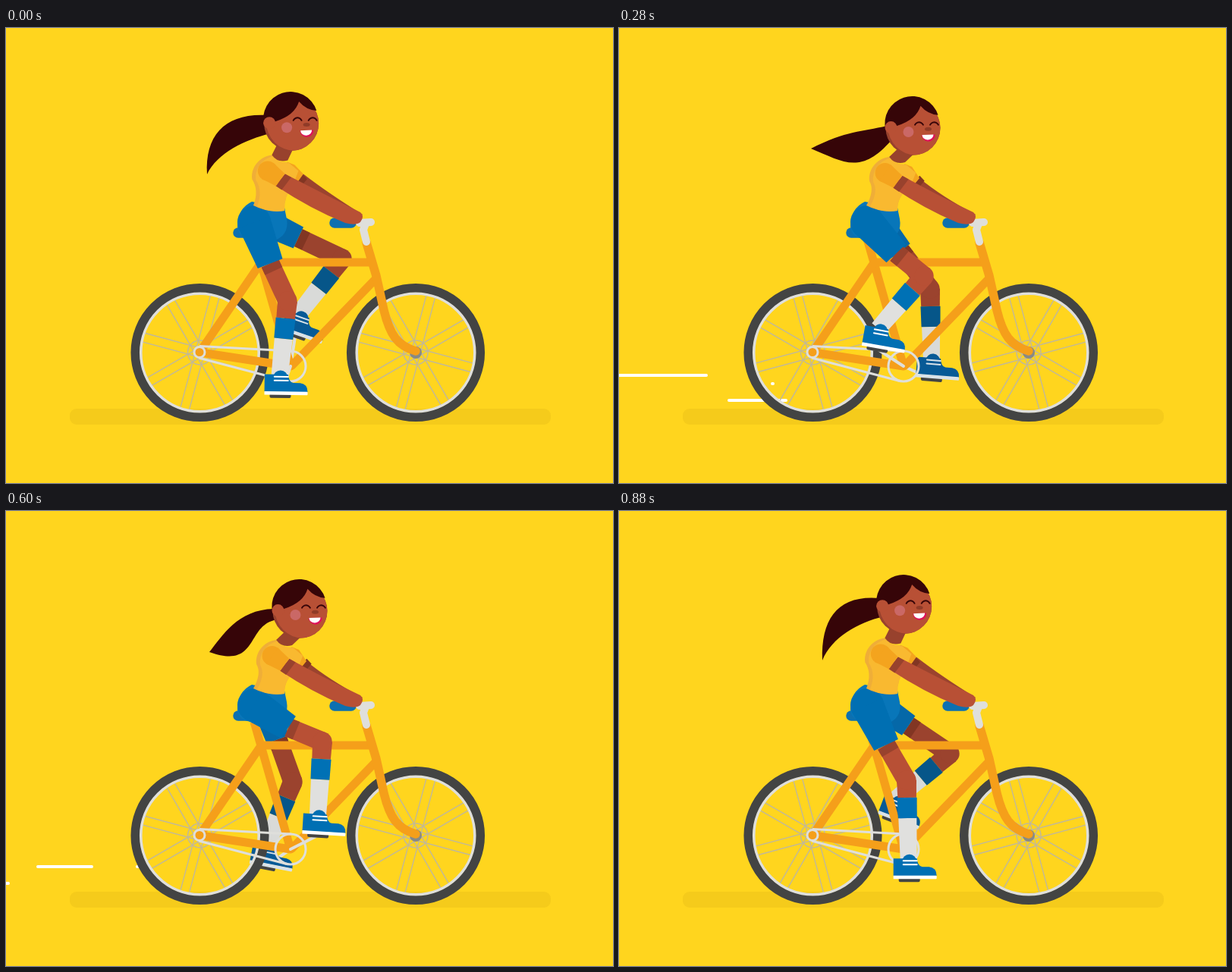
Write an HTML page with a canvas that moves like this. It is 800 by 600 pixels and loops after 0.96 s.

```html
<!DOCTYPE html>
<html lang="en">
<head>
<meta charset="utf-8">
<title>Cyclist</title>
<style>
  html, body { margin: 0; width: 100%; height: 100%; overflow: hidden; background: #ffd51e; }
  canvas { display: block; }
</style>
</head>
<body>
<canvas id="stage" width="800" height="600"></canvas>
<script>
const ctx = document.getElementById('stage').getContext('2d');
const LOOP = 960, STEP = 40, LAST_STEP = 22;
const TAU = Math.PI * 2, DEG = Math.PI / 180;
const CRANK = [375, 446], CRANK_R = 41;

const C = {
  bg: '#ffd51e', ground: '#f5cb1b', tyre: '#434443', rim: '#dfdfdb', spoke: '#c1b899',
  frame: '#f59f1a', metal: '#dfdfdb', grip: '#0d70b0',
  skin: '#b85035', skinDark: '#98422d', hair: '#360508',
  shirt: '#f9b930', shirtEdge: '#efae38', sleeve: '#f4a41e',
  hip: '#0876b9', white: '#ffffff'
};
const NEAR = { skin: C.skin, band: C.skinDark, shorts: '#006fb2', sock: '#0071b5', shin: '#e0e0de', shoe: '#006fb3', sole: '#ffffff' };
const FAR = { skin: '#9b432e', band: '#823623', shorts: '#0568a8', sock: '#065689', shin: '#d9dad8', shoe: '#075a96', sole: '#d9e2e8' };

// Poses are given at these times and joined by smooth periodic curves.
const KEY_TIMES = [0, 160, 280, 440, 600, 720, 880];
const NEAR_KNEE = [[371, 360], [380, 349], [402, 327], [425, 294], [417, 304], [404, 333], [379, 355]];
const FAR_KNEE = [[443, 304], [429, 316], [410, 344], [373, 358], [378, 357], [394, 345], [436, 320]];
// Root, two handles, tip, two handles, root.
const PONYTAIL = [
  [344, 115, 290, 112, 262, 140, 265, 193, 278, 165, 315, 147, 349, 139],
  [355, 132, 330, 140, 262, 122, 260, 168, 280, 156, 310, 190, 362, 150],
  [353, 129, 320, 137, 300, 135, 253, 159, 295, 176, 318, 195, 359, 148],
  [341, 120, 305, 135, 308, 170, 247, 157, 268, 200, 322, 208, 348, 142],
  [353, 129, 305, 130, 285, 165, 268, 186, 335, 210, 315, 148, 359, 143],
  [356, 129, 305, 122, 285, 153, 278, 202, 310, 190, 315, 155, 362, 146],
  [344, 115, 290, 110, 266, 140, 268, 197, 280, 167, 315, 147, 349, 139]
];
// Each streak: height, then time, left end, right end.
const STREAKS = [
  [458, [[100, 148, 152], [160, 107, 140], [280, -10, 117], [360, -90, 60], [430, -160, -10]]],
  [491, [[140, 240, 244], [160, 231, 239], [280, 143, 222], [440, 16, 140], [600, -70, 5], [640, -90, -40]]],
  [469, [[260, 207, 211], [280, 200, 205], [440, 105, 181], [600, 40, 115], [720, 20, 29], [740, 17, 21]]],
  [469, [[410, 222, 227], [440, 214, 219], [600, 171, 176], [720, 148, 153], [780, 139, 143]]]
];

function track(keys, t) {
  const n = keys.length;
  const time = i => KEY_TIMES[(i + n) % n] + LOOP * Math.floor(i / n);
  const value = i => keys[(i + n) % n];
  let i = n - 1;
  while (time(i) > t) i--;
  const span = time(i + 1) - time(i), u = (t - time(i)) / span;
  return value(i).map((a, k) => {
    const b = value(i + 1)[k];
    const m0 = (b - value(i - 1)[k]) / (time(i + 1) - time(i - 1)) * span;
    const m1 = (value(i + 2)[k] - a) / (time(i + 2) - time(i)) * span;
    const d = b - a;
    return a + u * (m0 + u * (3 * d - 2 * m0 - m1 + u * (m0 + m1 - 2 * d)));
  });
}

const add = (p, x, y) => [p[0] + x, p[1] + y];
const toward = (a, b, dist) => {
  const len = Math.hypot(b[0] - a[0], b[1] - a[1]);
  return [a[0] + (b[0] - a[0]) * dist / len, a[1] + (b[1] - a[1]) * dist / len];
};
const mix = (a, b, u) => a + (b - a) * u;

function fill(color) { ctx.fillStyle = color; ctx.fill(); }
function disc(x, y, r, color) { ctx.beginPath(); ctx.arc(x, y, r, 0, TAU); fill(color); }
function ring(x, y, r, w, color) {
  ctx.beginPath(); ctx.arc(x, y, r, 0, TAU);
  ctx.lineWidth = w; ctx.strokeStyle = color; ctx.stroke();
}
function line(points, w, color, cap = 'butt') {
  ctx.beginPath();
  points.forEach(p => ctx.lineTo(...p));
  ctx.lineWidth = w; ctx.strokeStyle = color; ctx.lineCap = cap; ctx.lineJoin = 'round';
  ctx.stroke();
}
function poly(points, color) {
  ctx.beginPath();
  points.forEach(p => ctx.lineTo(...p));
  ctx.closePath(); fill(color);
}
function pill(x, y, w, h, r, color) { ctx.beginPath(); ctx.roundRect(x, y, w, h, r); fill(color); }
// Tapered bar between two points with given half widths.
function limb(a, b, ra, rb, color) {
  const len = Math.hypot(b[0] - a[0], b[1] - a[1]);
  const nx = -(b[1] - a[1]) / len, ny = (b[0] - a[0]) / len;
  poly([add(a, nx * ra, ny * ra), add(b, nx * rb, ny * rb), add(b, -nx * rb, -ny * rb), add(a, -nx * ra, -ny * ra)], color);
}

function drawStreaks(t) {
  for (const [y, keys] of STREAKS) {
    const i = keys.findIndex((k, j) => j + 1 < keys.length && t >= k[0] && t < keys[j + 1][0]);
    if (i < 0) continue;
    const [a, b] = [keys[i], keys[i + 1]], u = (t - a[0]) / (b[0] - a[0]);
    line([[mix(a[1], b[1], u) + 2, y], [mix(a[2], b[2], u) - 2, y]], 4, C.white, 'round');
  }
}

function drawWheel(x, y, angle) {
  ctx.save();
  ctx.translate(x, y);
  ctx.rotate(angle);
  for (let i = 0; i < 4; i++) {
    for (const off of [-6, 6]) line([[-77, off], [77, off]], 1.4, C.spoke);
    ctx.rotate(Math.PI / 4);
  }
  ctx.restore();
  ring(x, y, 16, 1.5, C.spoke);
  ring(x, y, 78, 4, C.rim);
  ring(x, y, 85.3, 11.5, C.tyre);
}

function pedalAt(phase) {
  return [CRANK[0] - 0.5 - CRANK_R * Math.sin(phase), CRANK[1] + CRANK_R * Math.cos(phase)];
}

function drawShoe(pedal, tilt, k) {
  ctx.save();
  ctx.translate(...pedal);
  ctx.rotate(tilt);
  pill(-14, -3, 28, 6, 2, C.tyre);
  disc(0, -24, 9.5, k.shoe);
  ctx.beginPath();
  ctx.moveTo(-21, -28);
  ctx.lineTo(10, -28);
  ctx.quadraticCurveTo(11, -18, 17, -17);
  ctx.lineTo(26, -17);
  ctx.quadraticCurveTo(36, -16, 36, -5);
  ctx.lineTo(-21, -5);
  ctx.closePath();
  fill(k.shoe);
  pill(-21, -5.5, 57, 4.5, [0, 1, 1, 0], k.sole);
  for (const y of [-25, -20]) line([[-8, y], [10, y]], 2, k.sole, 'round');
  ctx.restore();
}

function drawLeg(hip, knee, pedal, tilt, k) {
  const ankle = add(pedal, 27 * Math.sin(tilt) * 0.5 - 1, -27);
  const hem = toward(hip, knee, 48);
  const sockTop = toward(knee, ankle, 23), sockEnd = toward(knee, ankle, 50);
  limb(knee, sockTop, 13, 12.3, k.skin);
  limb(hem, knee, 12.5, 12.7, k.skin);
  disc(...knee, 12.7, k.skin);
  limb(hem, toward(hem, knee, 11), 12.5, 12.5, k.band);
  limb(sockEnd, ankle, 12, 11, k.shin);
  limb(sockTop, sockEnd, 13, 12.5, k.sock);
  drawShoe(pedal, tilt, k);
  return hem;
}

function drawFrame() {
  line([[327, 278], [375, 446]], 11, C.frame);
  line([[335, 311], [257, 425]], 11, C.frame, 'round');
  line([[257, 428], [375, 446]], 11, C.frame, 'round');
  line([[334, 309], [483, 309]], 11, C.frame);
  line([[488, 330], [377, 445]], 11, C.frame, 'round');
  disc(540, 428, 8, '#888a85');
  ctx.beginPath();
  ctx.moveTo(475, 283);
  ctx.lineTo(488, 327);
  ctx.lineTo(498, 372);
  ctx.bezierCurveTo(506, 405, 516, 419, 540, 426);
  ctx.lineWidth = 11.5; ctx.strokeStyle = C.frame; ctx.lineCap = 'round'; ctx.stroke();
  line([[306, 270], [332, 270]], 13.5, C.grip, 'round');
}

function drawDrive(nearPedal) {
  line([[255, 419.5], [376, 426]], 3, C.metal);
  line([[254, 435], [370, 465.5]], 3, C.metal);
  disc(255, 427.5, 6, C.frame);
  ring(255, 427.5, 7, 3, C.metal);
  ring(...CRANK, 20, 3, C.metal);
  line([CRANK, nearPedal], 4, C.metal, 'round');
}

function drawHandlebar() {
  line([[433, 257], [455, 257]], 13.5, C.grip, 'round');
  line([[466, 257], [481, 256]], 10, C.metal, 'round');
  line([[474, 258], [471, 266], [475, 282]], 10, C.metal, 'round');
}

function drawShorts(hip, hem) {
  ctx.beginPath();
  ctx.moveTo(324, 229);
  ctx.quadraticCurveTo(305, 238, 305, 262);
  ctx.quadraticCurveTo(306, 277, 325, 278);
  ctx.lineTo(350, 282);
  ctx.quadraticCurveTo(374, 274, 370, 252);
  ctx.lineTo(367, 237);
  ctx.closePath();
  fill(C.hip);
  disc(327, 256, 22, NEAR.shorts);
  limb([327, 256], hem, 22, 17.5, NEAR.shorts);
}

function torsoPath(sx, sy) {
  ctx.beginPath();
  ctx.moveTo(354 + sx, 169 + sy);
  ctx.bezierCurveTo(338 + sx, 171 + sy, 326 + sx, 185 + sy, 328 + sx, 201 + sy);
  ctx.quadraticCurveTo(336 + sx * 0.6, 214, 326, 234);
  ctx.quadraticCurveTo(345, 244, 367, 241);
  ctx.quadraticCurveTo(366, 222, 382 + sx, 208 + sy);
  ctx.lineTo(389 + sx, 190 + sy);
  ctx.lineTo(376 + sx, 179 + sy);
  ctx.quadraticCurveTo(362 + sx, 180 + sy, 354 + sx, 169 + sy);
  ctx.closePath();
}

function drawTorso(lean, head) {
  const sx = 4.2 * lean, sy = 1.8 * lean;
  const cuffTop = [394.5 + 3 * lean, 196 + 4 * lean], cuffLow = [386 + 3 * lean, 207 + 3 * lean];
  ctx.beginPath();
  ctx.moveTo(...cuffTop);
  ctx.quadraticCurveTo(424, 220 + 3 * lean, 470, 246);
  ctx.lineTo(455, 252);
  ctx.lineTo(...cuffLow);
  fill(FAR.skin);
  limb([389 + sx, 200 + sy], [396 + sx, 206 + sy], 8, 7, FAR.band);
  poly([[374 + sx, 178 + sy], [384 + sx, 182 + sy], cuffTop, cuffLow], C.sleeve);

  torsoPath(sx, sy);
  fill(C.shirtEdge);
  ctx.save();
  ctx.clip();
  ctx.translate(5, 1);
  torsoPath(sx, sy);
  fill(C.shirt);
  ctx.restore();

  ctx.beginPath();
  ctx.moveTo(head[0] - 17, head[1] + 28);
  ctx.lineTo(354 + sx, 169 + sy);
  ctx.quadraticCurveTo(362 + sx, 180 + sy, 375 + sx, 176 + sy);
  ctx.lineTo(head[0] + 3, head[1] + 36);
  ctx.closePath();
  fill(C.skinDark);
}

function drawNearArm(lean) {
  const s = [348.5 + 4.2 * lean, 190 + 1.8 * lean];
  const top = add(s, 23, 4), low = add(s, 10.5, 19.5);
  ctx.beginPath();
  ctx.moveTo(...top);
  ctx.quadraticCurveTo((top[0] + 468) / 2, 220 + 2 * lean, 467, 243);
  ctx.quadraticCurveTo(473, 248, 467, 256);
  ctx.quadraticCurveTo(461, 261, 447, 257);
  ctx.quadraticCurveTo(403 + lean, 239, ...low);
  ctx.closePath();
  fill(C.skin);
  poly([top, low, add(low, 8, 5.5), add(top, 8, 4.5)], C.skinDark);
  disc(...s, 13, C.sleeve);
  limb(s, [(top[0] + low[0]) / 2, (top[1] + low[1]) / 2], 13, 10, C.sleeve);
}

function drawPonytail(t) {
  const p = track(PONYTAIL, t);
  ctx.beginPath();
  ctx.moveTo(p[0], p[1]);
  ctx.bezierCurveTo(...p.slice(2, 8));
  ctx.bezierCurveTo(...p.slice(8, 14));
  ctx.closePath();
  fill(C.hair);
}

function drawHead(head) {
  ctx.save();
  ctx.translate(...head);
  disc(0.5, 3, 36, C.skinDark);
  ctx.save();
  ctx.clip();
  disc(5, 1.5, 37.5, C.skin);
  ctx.restore();

  ctx.beginPath();
  ctx.arc(-0.6, -2.8, 36, -0.31, -Math.PI - 0.25, true);
  ctx.lineTo(-20, 0);
  ctx.quadraticCurveTo(5, -8, 10.5, -26);
  ctx.quadraticCurveTo(20, -15, 33.5, -14);
  ctx.closePath();
  fill(C.hair);
  disc(-28.5, 2.3, 8, C.skin);

  disc(-5.5, 8.3, 7, '#ca6866');
  ctx.beginPath();
  ctx.ellipse(20.5, 4.5, 4.5, 2.5, 0, 0, TAU);
  fill('#8f3b28');
  for (const x of [8.5, 28.5]) {
    ctx.beginPath();
    ctx.arc(x, 1.5, 6, 1.14 * Math.PI, 1.86 * Math.PI);
    ctx.lineWidth = 2; ctx.strokeStyle = C.hair; ctx.lineCap = 'round'; ctx.stroke();
  }
  for (const [x, rx, ry, color] of [[20.8, 9, 9, '#df1159'], [20, 7.5, 6.8, C.white]]) {
    ctx.beginPath();
    ctx.ellipse(x, 12, rx, ry, -0.04, 0, Math.PI);
    fill(color);
  }
  ctx.restore();
}

function draw(t) {
  const phase = (18.5 + 360 * t / LOOP) * DEG, farPhase = phase + 171 * DEG;
  const lean = -Math.cos(TAU * (t - 440) / 480);
  const head = [382.8 + 8.3 * lean, 126.6 + 4.3 * lean];
  const lift = p => (1 - Math.cos(p + 30 * DEG)) / 2;
  const nearPedal = pedalAt(phase), farPedal = pedalAt(farPhase);
  const nearHip = [328, 267], farHip = [342, 256];
  const spin = (15 + 360 * t / LOOP) * DEG;

  ctx.fillStyle = C.bg;
  ctx.fillRect(0, 0, 800, 600);
  pill(84, 502, 634, 21, 9, C.ground);
  drawStreaks(t);

  line([CRANK, farPedal], 4, C.metal, 'round');
  const farHem = drawLeg(farHip, track(FAR_KNEE, t), farPedal, (3 + 18 * lift(farPhase)) * DEG, FAR);
  limb(farHip, farHem, 18, 15.5, FAR.shorts);

  drawWheel(255.5, 428, spin);
  drawWheel(540, 428, spin);
  drawFrame();
  drawDrive(nearPedal);
  drawHandlebar();

  const nearHem = drawLeg(nearHip, track(NEAR_KNEE, t), nearPedal, 11 * lift(phase) ** 1.5 * DEG, NEAR);
  drawShorts(nearHip, nearHem);
  drawTorso(lean, head);
  drawPonytail(t);
  drawHead(head);
  drawNearArm(lean);
}

function tick() {
  const step = Math.floor(performance.now() % LOOP / STEP);
  draw(Math.min(step, LAST_STEP) * STEP);
  requestAnimationFrame(tick);
}
tick();
</script>
</body>
</html>
```
